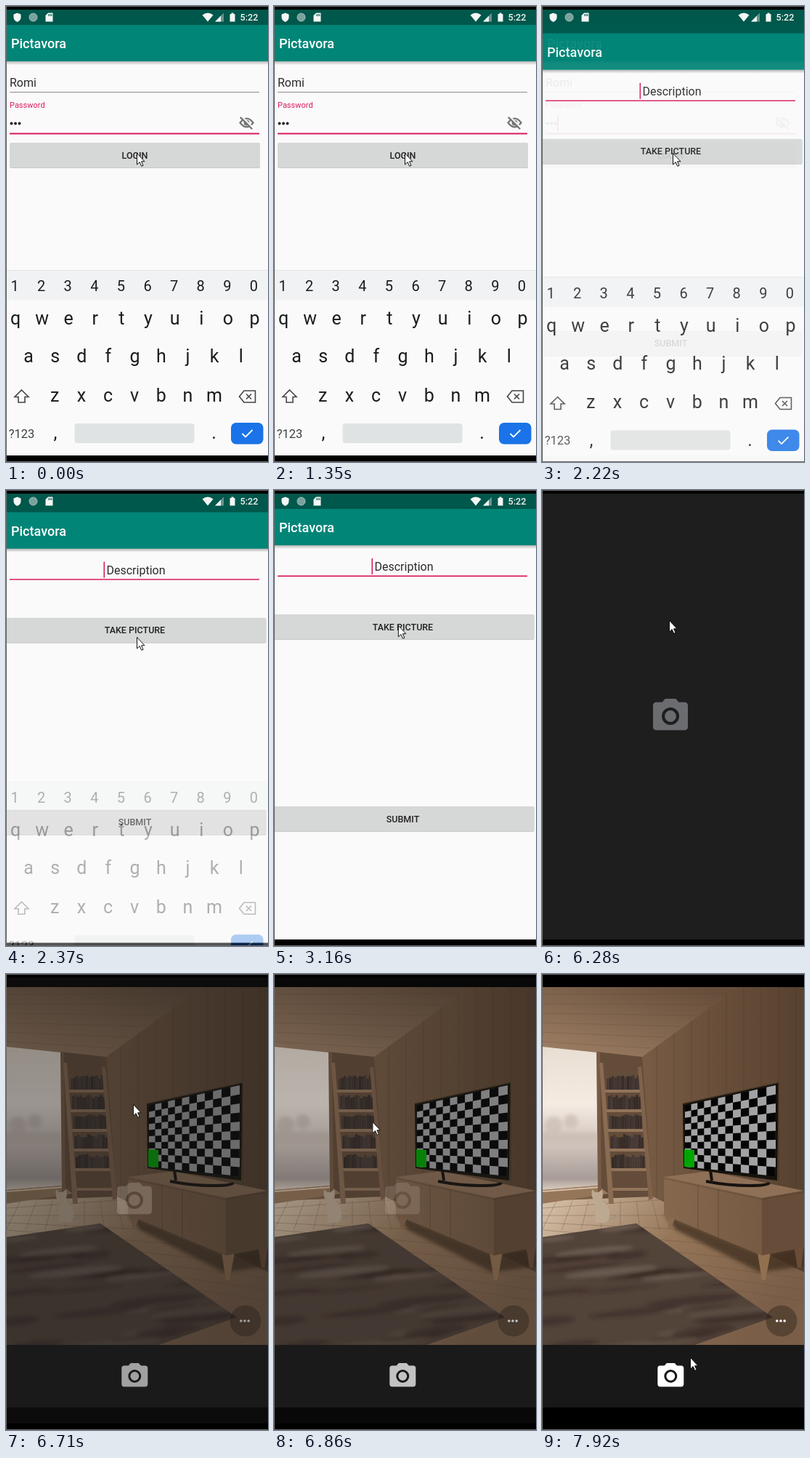
An HTML page that plays this animation: 361x627 px, repeating every 8 s.

```html
<!DOCTYPE html>
<html lang="en">
<head>
<meta charset="utf-8">
<title>Login to camera</title>
<style>
  html, body { margin: 0; width: 100%; height: 100%; overflow: hidden; background: #000; }
  svg { display: block; width: 361px; height: 627px; font-family: Roboto, sans-serif; }
  .label { font-size: 12.5px; font-weight: 500; fill: #222; text-anchor: middle; }
  .field { font-size: 16px; fill: #2b2b2b; }
  #keys text { font-size: 25px; fill: #1b1c1e; text-anchor: middle; }
  #keys .digit { font-size: 20px; }
  #keys .small { font-size: 16.5px; fill: #3c4043; }
</style>
</head>
<body>
<svg viewBox="0 0 361 627">
  <defs>
    <linearGradient id="shade" x2="0" y2="1"><stop stop-opacity=".28"/><stop offset="1" stop-opacity="0"/></linearGradient>
    <linearGradient id="ceiling" x1="0" y1="1" x2=".8" y2="0"><stop stop-color="#a08166"/><stop offset="1" stop-color="#664e3b"/></linearGradient>
    <linearGradient id="wall" x1=".3"><stop stop-color="#7c5f47"/><stop offset="1" stop-color="#57412f"/></linearGradient>
    <linearGradient id="sky" x2="0" y2="1"><stop stop-color="#e9ded2"/><stop offset=".4" stop-color="#f4ebe2"/><stop offset=".7" stop-color="#cfc2ba"/><stop offset=".92" stop-color="#a79c98"/><stop offset="1" stop-color="#dccdbe"/></linearGradient>
    <linearGradient id="floor" x2="1" y2=".5"><stop stop-color="#d8c3ab"/><stop offset=".5" stop-color="#957659"/><stop offset="1" stop-color="#7a5e48"/></linearGradient>
    <linearGradient id="front"><stop stop-color="#86684e"/><stop offset="1" stop-color="#765a43"/></linearGradient>
    <filter id="soft"><feGaussianBlur stdDeviation="2.5"/></filter>
    <clipPath id="view"><path d="M1 18h360v492H1z"/></clipPath>
    <clipPath id="rug"><path d="M0 362L130 343 318 472 205 512H0z"/></clipPath>
    <path id="photo" fill-rule="evenodd" d="M9 2 7.2 4H4q-2 0-2 2v12q0 2 2 2h16q2 0 2-2V6q0-2-2-2h-3.2L15 2zM12 7a5 5 0 1 1 0 10a5 5 0 0 1 0-10zM12 8.7a3.3 3.3 0 1 0 0 6.6a3.3 3.3 0 0 0 0-6.6z"/>
    <g id="page">
      <path fill="#00574b" d="M1 5h360v21H1z"/>
      <path fill="#fafafa" d="M1 76h360v542H1z"/>
      <path fill="#008577" d="M1 26h360v50H1z"/>
      <path fill="url(#shade)" d="M1 76h360v5H1z"/>
      <path d="M1 618h360v14H1z"/>
      <text x="7" y="58" font-size="18" font-weight="500" fill="#fff">Pictavora</text>
    </g>
  </defs>

  <g id="phone">
    <g id="login">
      <use href="#page"/>
      <text class="field" x="5" y="111">Romi</text>
      <path fill="#8d8d8d" d="M5 118h344v1H5z"/>
      <text x="5" y="140" font-size="11" fill="#d81b60">Password</text>
      <path stroke="#222" stroke-width="4" stroke-linecap="round" stroke-dasharray="0 5.5" d="M7.5 161.5h12"/>
      <path fill="#d81b60" d="M5 174.6h344v1.8H5z"/>
      <path id="passCaret" fill="#d81b60" d="M21 150h2v22h-2z"/>
      <g transform="translate(320.5 149.5) scale(.92)" fill="none" stroke="#757575" stroke-width="2.4">
        <path d="M2.2 12Q12-.8 21.8 12Q12 24.8 2.2 12z"/><circle cx="12" cy="12" r="3" fill="#757575"/>
        <path stroke="#fafafa" d="M4.5 2.5 22 20"/><path d="M2.5 3.7 20.3 21.5"/>
      </g>
    </g>

    <g id="compose">
      <use href="#page"/>
      <text class="field" x="179" y="111" text-anchor="middle">Description</text>
      <path fill="#d81b60" d="M5 117.6h344v1.6H5z"/>
      <path id="textCaret" fill="#d81b60" d="M134.500 94h1.600v22h-1.600z"/>
    </g>

    <g id="keys"></g>

    <g fill="#f4f7f6">
      <path d="M10.500 11.500 15.500 9.500l5 2v4q0 4-5 6.500q-5-2.500-5-6.500z"/>
      <circle cx="37.5" cy="15.5" r="5.5" fill="#78a39c" stroke="#a5c2bd"/>
      <path d="M58 9.500h6.500v12h-10v-8.500z"/>
      <path fill="#00574b" d="M58.300 11h1v3h-1zm2 0h1v3h-1zm2 0h1v3h-1z"/>
      <path d="M270.500 12.500q7.500-6 15 0L278 21.500z"/>
      <path opacity=".4" d="M300 9.500v12h-12z"/><path d="M296 13.500v8h-8z"/>
      <path d="M310.500 9.500h3v1.500h2v10.500h-7V11h2z"/>
      <path id="pin" fill-rule="evenodd" d="M259 9a4.300 4.300 0 0 1 4.300 4.300q0 3-4.300 8.500q-4.300-5.500-4.300-8.500A4.300 4.300 0 0 1 259 9zm0 2.800a1.600 1.600 0 1 0 0 3.200a1.600 1.600 0 0 0 0-3.200z"/>
      <text id="clock" x="322.5" y="20" font-size="12.6" font-weight="500"></text>
    </g>
  </g>

  <g id="camera">
    <g id="preview">
      <path d="M1 1h360v626H1z"/>
      <g id="scene" clip-path="url(#view)"></g>
      <circle cx="330" cy="477" r="21.5" fill="#1c1511" opacity=".35"/>
      <path stroke="#fff" stroke-width="3.6" stroke-linecap="round" stroke-dasharray="0 5.2" d="M323.8 477h11"/>
      <path fill="#181818" d="M1 510h360v86H1z"/>
      <use href="#photo" fill="#fff" transform="translate(155.700 531.400) scale(1.800)"/>
    </g>
    <g id="splash">
      <path fill="#1e1e1e" d="M1 5h360v613H1z"/>
      <use href="#photo" fill="#6b6c70" transform="translate(148.200 282.200) scale(2.400)"/>
    </g>
  </g>

  <path d="M0 0h361v5H0z"/>
  <path fill="#666" d="M0 0h361v1H1v625h360v1H0z"/>
  <path id="cursor" fill="#fff" stroke="#111" d="M.500.500V16l3.600-3.400 2.600 5.700 2.300-1-2.500-5.500H11z"/>
</svg>

<script>
const $ = id => document.getElementById(id);
const add = (id, markup) => $(id).insertAdjacentHTML('beforeend', markup);
const poly = (points, fill, extra = '') => `<polygon points="${points}" fill="${fill}" ${extra}/>`;
const line = (d, color, width = 1, opacity = 1) =>
  `<path d="${d}" fill="none" stroke="${color}" stroke-width="${width}" opacity="${opacity}"/>`;
const repeat = (n, make) => Array.from({ length: n }, (_, i) => make(i)).join('');
let seed = 7;
const random = () => (seed = seed * 16807 % 2147483647) / 2147483647;

function button(id, x, y, width, label) {
  const box = `x="${x}" width="${width}" height="34" rx="2"`;
  return `<rect id="${id}Shadow" ${box} y="${y + 1}" opacity=".2"/>
    <rect ${box} y="${y}" fill="#d6d7d7"/>
    <rect id="${id}Press" ${box} y="${y}" opacity="0"/>
    <rect id="${id}Ripple" y="${y}" height="34" opacity="0"/>
    <text class="label" x="177.5" y="${y + 21.5}">${label}</text>`;
}
add('login', button('enter', 5, 188, 345, 'LOGIN'));
add('compose', button('take', 0, 171, 358.5, 'TAKE PICTURE') + button('send', 0, 435, 358.5, 'SUBMIT'));

// Keyboard
const row = (chars, x, y, cls = '') =>
  repeat(chars.length, i => `<text class="${cls}" x="${x + 36.6 * i}" y="${y}">${chars[i]}</text>`);
add('keys', `<path fill="#fafafa" d="M1 363h360v255H1z"/><path fill="#f1f2f4" d="M1 363h360v41H1z"/>
  <path fill="#e3e4e6" d="M1 363h360v1H1z"/>`
  + row('1234567890', 12, 392, 'digit') + row('qwertyuiop', 13, 438)
  + row('asdfghjkl', 31, 490) + row('zxcvbnm', 67.3, 543.5)
  + `<text class="small" x="21.5" y="593.5">?123</text><text x="68" y="595">,</text><text x="286.5" y="595">.</text>
  <rect x="94.5" y="574" width="165" height="27" rx="4" fill="#e0e3e3"/>
  <rect x="310" y="573" width="44.5" height="29.5" rx="7" fill="#1a73e8"/>`
  + line('M325.5 588l4.5 4.5 9.5-9.5', '#fff', 1.8)
  + line('M21.5 528l9.5 9.5h-5v7.5h-9v-7.5h-5z', '#444', 1.6)
  + line('M328 529h15.5v16H328l-6.5-8zM331 533.5l7 7m0-7l-7 7', '#444', 1.6));

// Checkered screen seen in perspective
function screenPoint(u, v) {
  const s = .8 * u / (1 - .2 * u);
  const top = 181 - 28 * s, bottom = 265 + 13 * s;
  return `${197 + 125 * s} ${top + (bottom - top) * v}`;
}
const corner = (c, r) => screenPoint(c / 12, r / 10);
const checks = repeat(12, c => repeat(10, r => (c + r) % 2
  ? `M${corner(c, r)}L${corner(c + 1, r)}L${corner(c + 1, r + 1)}L${corner(c, r + 1)}z` : ''));

const planks = repeat(9, i => `M${158 + 24 * i} ${Math.max(18, 99 - 18 * i)}V450`);
const boards = repeat(6, i => `M0 ${28 + 13 * i}L${255 - 21 * i} ${27 + 15 * i}`);
const joints = repeat(8, i => `M0 ${322 + 10 * i}L${170 + 40 * i} ${310 + 22 * i}M${20 + 22 * i} 312l${5 * i - 20} 40`);
const shelves = repeat(6, i => {
  const x = 86 + 1.8 * i, y = 159 + 27 * i, width = 51 + .8 * i;
  const books = i < 5 && repeat(13, b => {
    const height = 15 + 5 * random();
    return `<rect x="${x + 3 + 3.5 * b}" y="${y - height}" width="3.3" height="${height}" fill="hsl(17 14% ${17 + 8 * random()}%)"/>`;
  });
  return (books || '') + `<rect x="${x}" y="${y}" width="${width}" height="4" fill="#92745a"/>`;
});
const streaks = repeat(34, () => {
  const y = 350 + 165 * random(), light = random() < .45;
  return `<ellipse cx="${280 * random()}" cy="${y}" rx="${25 + 45 * random()}" ry="${2 + 4 * random()}"
    fill="${light ? '#86766a' : '#30251e'}" opacity="${light ? .6 - (y - 350) / 400 : .5}"/>`;
});

add('scene',
  poly('0,18 361,18 361,510 0,510', 'url(#wall)')
  + poly('0,18 270,18 138,114 0,100', 'url(#ceiling)')
  + line(boards, '#4d3827', 1, .2) + line(planks, '#3e2b20', 1, .25)
  + poly('76,107 138,114 153,312 76,312', '#644c3a')
  + poly('0,312 153,306 361,410 361,510 0,510', 'url(#floor)') + line(joints, '#644a36', 1, .35)
  + poly('0,100 77,108 77,291 0,297', 'url(#sky)')
  + '<g fill="#c9bcb3" opacity=".7" filter="url(#soft)"><circle cx="16" cy="208" r="12"/><circle cx="40" cy="203" r="10"/><path d="M0 217h77v16H0z"/></g>'
  + poly('0,297 77,291 92,302 0,316', '#967659') + line('M0 299L80 293', '#d7c0a7', 2)
  + poly('75,108 80,108 82,300 77,300', '#775a44')
  + shelves + poly('79,122 84,122 99,316 92,316', '#8a6c52') + poly('132,128 137,128 153,309 147,311', '#80624a')
  + `<g clip-path="url(#rug)"><path fill="#53443a" d="M0 340h320v172H0z"/><g filter="url(#soft)" transform="rotate(-6 100 420)">${streaks}</g></g>`
  + poly('168,330 303,386 361,376 361,402 300,410 185,352', '#3a291e', 'opacity=".7" filter="url(#soft)"')
  + poly('173,330 184,334 178,349 174,349', '#8c6b4e') + poly('297,383 315,383 308,421 303,421', '#92704f')
  + poly('347,374 361,372 357,404 352,404', '#6a4d38')
  + poly('168,279 230,271 361,298 303,308', '#8e7056')
  + poly('168,279 303,308 303,387 168,331', 'url(#front)') + poly('303,308 361,298 361,376 303,387', '#674d39')
  + line('M168 281L303 310L361 300M215 290V350M243 296V362', '#4e3827', 1, .5)
  + line('M232 270l2 14M226 285q30 6 60 6q25 0 27-4', '#17120f', 4)
  + poly('194,178 326,149 324,284 195,267', '#16120d') + line('M195 178.5L326 149.5V283', '#4a3825')
  + poly('197,181 322,153 320,278 197,265', '#050505') + `<path fill="#a3a3a5" d="${checks}"/>`
  + poly('196,241 210,242 210,266 196,265', '#00a600')
  + line('M92 336q10 1 14-6', '#a8937e', 3)
  + '<path fill="#bda892" d="M69 296l4 4h5l5-4q2 10-1 15q12 7 11 21q0 9-7 10H74q-3-1 0-7q-3-13-1-21q-6-7-4-18z"/>');

// Motion
const clamp = x => Math.min(1, Math.max(0, x));
const shown = (id, on) => $(id).setAttribute('display', on ? 'inline' : 'none');
const fade = (id, value) => $(id).setAttribute('opacity', value);
const move = (id, x, y) => $(id).setAttribute('transform', `translate(${x} ${y})`);

// The button lifts and darkens, then settles at the given rest tint
function press(id, elapsed, rest) {
  const p = clamp(elapsed / 400), swell = Math.sin(Math.PI * p);
  move(id + 'Shadow', 0, 3 * swell);
  fade(id + 'Press', Math.max(.05 * swell, rest * p));
  fade(id + 'Ripple', p > 0 && (rest || elapsed < 700) ? .015 : 0);
  $(id + 'Ripple').setAttribute('x', 174.5 - 95 * p);
  $(id + 'Ripple').setAttribute('width', 190 * p);
}

// Stops of the pointer: time, x, y
const stops = [[2750, 180, 202], [2890, 166, 194], [3150, 175, 179], [6720, 175, 179],
  [6945, 76, 239], [7215, 201, 499], [7350, 185, 367], [7485, 97, 430], [7890, 204, 527]];
function pointer(t) {
  const i = stops.findIndex(stop => stop[0] > t);
  if (i < 1) return (i ? stops.at(-1) : stops[0]).slice(1);
  const [a, b] = [stops[i - 1], stops[i]];
  const p = (t - a[0]) / (b[0] - a[0]);
  return [1, 2].map(k => a[k] + (b[k] - a[k]) * p);
}

function draw(t) {
  const held = 60 + 135 * Math.floor((t - 60) / 135);  // the recording's low frame rate

  shown('passCaret', t >= 250 && t < 710 || t >= 2070);
  shown('textCaret', t < 3560 && Math.floor((t - 2110) / 525) % 2 === 0);
  press('enter', held - 550, 0);
  press('take', held - 3450, .03);

  const enter = clamp((held - 2175) / 405);
  move('compose', 0, 15 * (1 - enter) ** 2);
  fade('compose', enter && Math.min(1, .85 + .75 * enter));
  move('keys', 0, 86 * enter);
  fade('keys', clamp(1 - 1.5 * enter));

  $('clock').textContent = t < 3830 ? '5:22' : '5:23';
  shown('pin', t >= 4260);
  shown('phone', t < 6280);
  shown('camera', t >= 6280);
  fade('splash', t < 6710 ? 1 : clamp((7050 - held) / 900));
  move('cursor', ...pointer(held));
}

const start = performance.now();
function tick() {
  draw((performance.now() - start) % 8000);
  requestAnimationFrame(tick);
}
tick();
</script>
</body>
</html>
```
